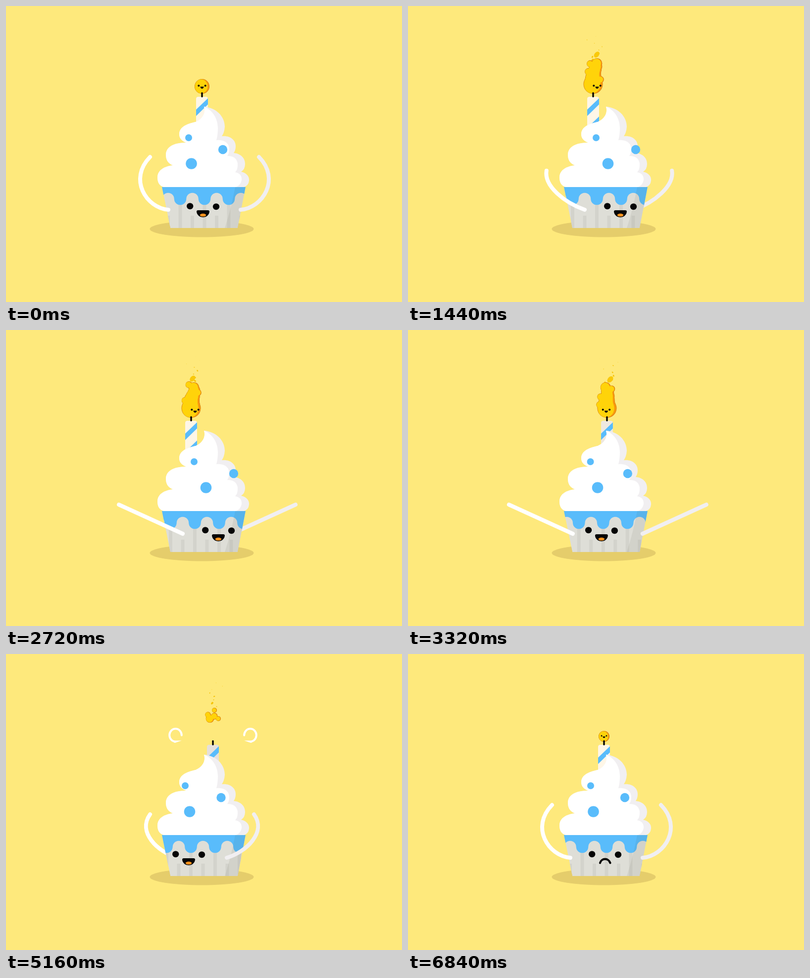
These frames come from a looping animation (800 px wide and 600 px high, 6880 ms). An HTML page with a canvas:

```html
<!DOCTYPE html>
<html lang="en">
<head>
<meta charset="utf-8">
<title>Cupcake</title>
<style>
  html, body { margin: 0; width: 100%; height: 100%; overflow: hidden; background: #fee97c; }
  canvas { display: block; width: 800px; height: 600px; }
</style>
</head>
<body>
<canvas id="stage" width="800" height="600"></canvas>
<script>
const ctx = document.getElementById('stage').getContext('2d');
const LOOP = 6880, STEP = 40;
const BLUE = '#59bcfb', WHITE = '#fff', CREAM_SHADE = '#f1eff1', INK = '#050505';

const clamp = (v, a = 0, b = 1) => Math.min(b, Math.max(a, v));
const lerp = (a, b, k) => a + (b - a) * k;
const mix = (a, b, k) => a.map((v, i) => lerp(v, b[i], k));
const span = (t, start, length) => clamp((t - start) / length);
const ease = x => x < .5 ? 4 * x ** 3 : 1 - 4 * (1 - x) ** 3;
const rand = n => { const s = Math.sin(n * 91.7 + 4.3) * 4375.85; return s - Math.floor(s); };

// candle, face, three dots, left shoulder, right shoulder, flame face shift, candle light
const FRONT = [396, 398, 369, 438, 374.5, 328, 474, 0, 1];
const RIGHT = [374, 429, 380, 460, 404, 357, 456, 8, 1];
const LEFT = [418, 369, 362, 434.5, 371, 346, 446, -7, 0];

// arm curves relative to the left shoulder: two handles and the hand
const ARM_UP = [-45, -4, -81, -62, -37, -107];
const ARM_RISING = [-40, -12, -81, -52, -55, -88];
const ARM_STRAIGHT = [-43, -20, -86, -39, -129, -59];
const ARM_LOW = [-45, -27, -93, -40, -137, -38];
const ARM_SAD = [-50, -22, -95, -14, -120, 38];
const WAVE = [ARM_UP, mix(ARM_RISING, ARM_STRAIGHT, .3), ARM_LOW, ARM_STRAIGHT, ARM_RISING];

function poseAt(t) {
  if (t < 2880) return mix(FRONT, RIGHT, ease(span(t, 280, 800)));
  if (t >= 5200) return mix(LEFT, FRONT, ease(span(t, 5200, 520)));
  const k = ease(span(t, 2880, 800));
  const pose = mix(RIGHT, LEFT, k), far = clamp(k * 2 - 1);
  pose[5] = k < .5 ? lerp(357, 328, k * 2) : lerp(328, 346, far);
  pose[6] = k < .5 ? lerp(456, 476, k * 2) : lerp(476, 446, far * far);
  return pose;
}

function armAt(t) {
  if (t < 5200) return WAVE[Math.floor(t / STEP) % 5];
  if (t < 6640) {
    const k = ease(span(t, 5200, 520));
    return k < .5 ? mix(ARM_UP, ARM_STRAIGHT, k * 2) : mix(ARM_STRAIGHT, ARM_SAD, k * 2 - 1);
  }
  const k = ease(span(t, 6640, 180));
  return k < .5 ? mix(ARM_SAD, ARM_STRAIGHT, k * 2) : mix(ARM_STRAIGHT, ARM_UP, k * 2 - 1);
}

function fill(path, color) { ctx.fillStyle = color; ctx.fill(path); }

function ellipse(x, y, rx, ry, color, turn = 0) {
  ctx.fillStyle = color;
  ctx.beginPath();
  ctx.ellipse(x, y, rx, ry, turn, 0, 7);
  ctx.fill();
}

function stroke(path, color, width) {
  ctx.lineCap = 'round';
  ctx.strokeStyle = color;
  ctx.lineWidth = width;
  ctx.stroke(path);
}

function arm(x, curve, side, color) {
  const path = new Path2D(), c = curve.map((v, i) => i % 2 ? 413 + v : x + side * v);
  path.moveTo(x, 413);
  path.bezierCurveTo(...c);
  stroke(path, color, 8);
}

const creamOuter = new Path2D(`M400 204C424 206 442 223 442 245Q441 257 436 264
  C452 262 464 271 464 284Q464 292 460 298C474 299 483 308 483 320Q483 331 475 336
  C486 338 492 346 491 354Q490 364 481 367H319C310 365 306 357 306 348
  C306 333 319 325 337 323C327 319 323 311 323 302C323 286 338 277 364 277
  C354 273 350 267 350 260C350 243 370 238 383 235C397 229 404 217 400 204Z`);
const creamInner = new Path2D(`M400 204C418 211 428 229 428 248Q428 261 425 272
  C442 270 451 279 451 290Q451 298 447 304C461 303 469 312 468 323Q468 332 463 337
  C473 338 477 346 476 353Q474 363 465 367H319C310 365 306 357 306 348
  C306 333 319 325 337 323C327 319 323 311 323 302C323 286 338 277 364 277
  C354 273 350 267 350 260C350 243 370 238 383 235C397 229 404 217 400 204Z`);
const cup = new Path2D('M315 367H484L468 450H332Z');
const cupShade = new Path2D('M463 367H484L468 450H442Q455 410 463 367Z');

function drawCup(faceX) {
  const shift = (faceX - 398) * .95;
  ctx.save();
  ctx.clip(cup);
  fill(cup, '#deded7');
  for (let i = -4; i < 10; i++) {
    const top = i % 2 ? 425 : 396;
    ctx.fillStyle = '#d3d3cc';
    ctx.fillRect(348.5 + shift + i * 24.5, top, 7, 450 - top);
  }
  const icing = new Path2D(), r = 12.25;
  icing.moveTo(200, 360);
  for (let i = -4; i < 10; i++) {
    icing.arc(352 + shift + i * 24.5, 391, r, Math.PI, 0, i % 2 === 0);
  }
  icing.lineTo(620, 360);
  icing.closePath();
  fill(icing, BLUE);
  fill(cupShade, 'rgba(60,60,40,.07)');
  ctx.restore();
}

function drawFace(x, sad) {
  ellipse(x - 26.3, 405.7, 6.7, 6.5, INK);
  ellipse(x + 26.5, 406.7, 6.7, 6.5, INK);
  if (sad) {
    stroke(new Path2D(`M${x - 10} 423.5C${x - 7} 413 ${x + 7} 413 ${x + 10.5} 423.5`), INK, 4.2);
    return;
  }
  fill(new Path2D(`M${x - 10} 414H${x + 10}Q${x + 13} 414 ${x + 13} 417
    C${x + 11} 432 ${x - 11} 432 ${x - 13} 417Q${x - 13} 414 ${x - 10} 414Z`), INK);
  ellipse(x, 423.8, 6.3, 3, '#f7931e');
}

function drawCandle(x, light) {
  const body = new Path2D();
  body.roundRect(x - 12, 184, 24, 70, 4);
  ctx.save();
  ctx.clip(body);
  const [r, g, b] = mix([229, 224, 220], [254, 246, 231], light);
  fill(body, `rgb(${r},${g},${b})`);
  for (const y of [0, 37]) {
    fill(new Path2D(`M${x - 12} ${y + 210}L${x + 12} ${y + 187}V${y + 199.5}L${x - 12} ${y + 223}Z`), BLUE);
  }
  ctx.restore();
}

function drawBlobs(blobs) {
  blobs = blobs.filter(b => b[2] > .6);
  for (const [x, y, r] of blobs) ellipse(x, y, r, r, '#c9760b');
  for (const [x, y, r] of blobs) ellipse(x, y, r - .6, r - .6, '#f8980f');
  for (const [x, y, r] of blobs) {
    ellipse(x - r * .1, y, Math.max(.4, r * .85), Math.max(.4, r - .8), '#ffd30a');
  }
}

function drawSparks(t, x) {
  if (t < 360 || t > 5360) return;
  const fade = 1 - span(t, 5160, 200);
  for (let i = 0; i < 9; i++) {
    const age = t / 720 + i / 9, life = age % 1, seed = Math.floor(age) * 9 + i;
    const px = x + 4 + (rand(seed) - .5) * 30 * (.5 + life);
    const size = (1 - life) * (1 + 2 * rand(seed + 50)) * fade;
    ellipse(px, 110 - life * 62, size * .8, size * 1.2, '#f6c40c', rand(seed) * 3);
  }
  if (t < 5080) {
    const life = t % 640 / 640;
    ellipse(x + 4 + 4 * Math.sin(t / 170), 105 - life * 26, 6 * (1 - life), 9 * (1 - life), '#f9c90a', .7);
  }
}

function drawFlame(t, x, faceShift) {
  drawSparks(t, x);
  const since = t >= 6640 ? t - LOOP : t;
  if (t >= 5080 && t < 6640) {
    const k = 1 - span(t, 5120, 240), rise = (t - 5160) * .12;
    drawBlobs([[x - 6, 131 - rise, 10 * k], [x - 10, 123 - rise, 7 * k],
      [x + 3, 126 - rise, 8 * k], [x + 11, 131 - rise, 6 * k], [x + 3, 114 - rise, 6 * k]]);
    return;
  }
  const r = clamp(15 + since / 10, 0, 19.5);
  if (r <= 0) return;
  const grow = ease(span(since, 80, 440)), lean = faceShift * .6;
  const blobs = [[x, 178 - r, r]];
  if (grow > 0) {
    for (let i = 1; i < 8; i++) {
      const sway = Math.sin(t / 110 - i * .8) * i * .45;
      blobs.push([x + sway + lean * i / 7, 158.5 - i * 6 * grow, lerp(r, 19 - i * 1.2, grow)]);
    }
    for (let i = 0; i < 3; i++) {
      const life = (t / 520 + i / 3) % 1, side = i % 2 ? 1 : -1;
      blobs.push([x + lean * life + side * (15 - 7 * life), 154 - 48 * life * grow, 7 * grow]);
    }
  }
  drawBlobs(blobs);
  const fx = x + faceShift, k = Math.min(1, r / 15), fy = 178 - 16.5 * k;
  ellipse(fx - 6.7 * k, fy, 2 * k, 2 * k, INK);
  ellipse(fx + 6.7 * k, fy, 2 * k, 2 * k, INK);
  fill(new Path2D(`M${fx - 3.5 * k} ${fy + 2 * k}H${fx + 3.5 * k}
    Q${fx + 3 * k} ${fy + 6 * k} ${fx} ${fy + 6 * k}Q${fx - 3 * k} ${fy + 6 * k} ${fx - 3.5 * k} ${fy + 2 * k}Z`), INK);
}

function drawPuffs(t, x) {
  if (t < 5080 || t > 5240) return;
  const travel = 69 + (t - 5160) * 1.3;
  const tail = Math.max(0, travel), head = Math.min(130, travel + 61);
  if (head <= tail) return;
  const curl = new Path2D();
  curl.moveTo(-8, 178);
  curl.lineTo(-77, 178);
  curl.ellipse(-75.5, 164.5, 12.3, 13, 0, Math.PI / 2, Math.PI * 2.08);
  for (const side of [1, -1]) {
    ctx.save();
    ctx.translate(x, 0);
    ctx.scale(side, 1);
    ctx.setLineDash([head - tail, 999]);
    ctx.lineDashOffset = -tail;
    stroke(curl, WHITE, 4);
    ctx.restore();
  }
}

function draw(t) {
  const [candle, face, dotA, dotB, dotC, leftX, rightX, flameFace, light] = poseAt(t);
  const curve = armAt(t);
  const leftArm = () => arm(leftX, curve, 1, WHITE);
  const rightArm = () => arm(rightX, curve, -1, CREAM_SHADE);
  const leftInFront = face > 382, rightInFront = face < 414;

  ctx.fillStyle = '#fee97c';
  ctx.fillRect(0, 0, 800, 600);
  ellipse(395.5, 452, 105, 16.5, '#e5cd6b');
  if (!leftInFront) leftArm();
  if (!rightInFront) rightArm();

  drawCandle(candle, light);
  drawFlame(t, candle, flameFace);
  stroke(new Path2D(`M${candle} 176.5V183.5`), INK, 3.4);
  drawPuffs(t, candle);

  fill(creamOuter, CREAM_SHADE);
  fill(creamInner, WHITE);
  ellipse(dotA, 267, 7, 7, BLUE);
  ellipse(dotB, 291, 9.2, 9.2, BLUE);
  ellipse(dotC, 319.5, 11.3, 11.3, BLUE);
  drawCup(face);
  drawFace(face, t >= 5400);
  if (leftInFront) leftArm();
  if (rightInFront) rightArm();
}

const begin = performance.now();
function tick() {
  const t = (performance.now() - begin) % LOOP;
  draw(Math.floor(t / STEP) * STEP);
  requestAnimationFrame(tick);
}
tick();
</script>
</body>
</html>
```
